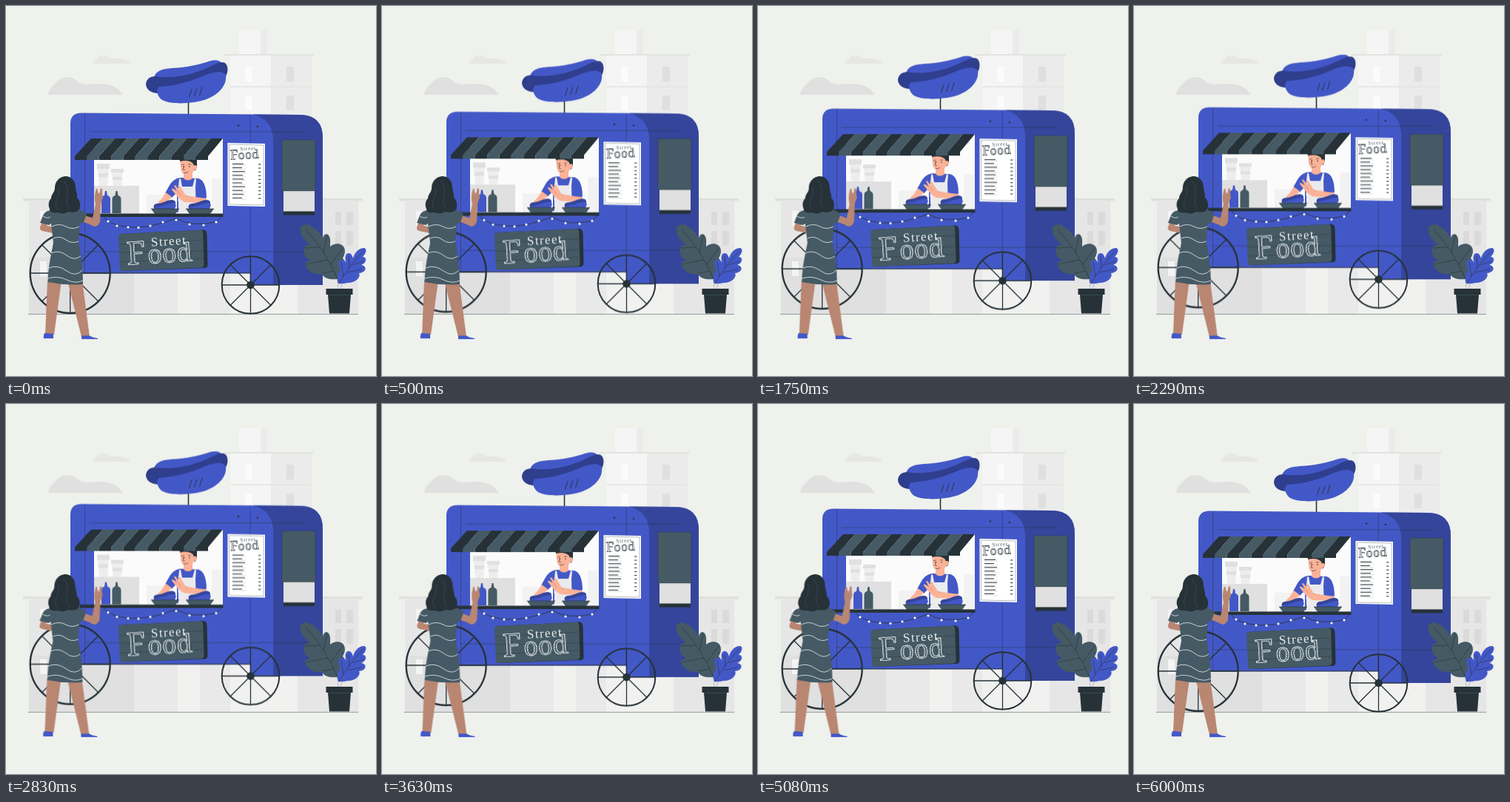
These frames come from a looping animation (500x500 px, 6040 ms). An HTML page:

```html
<!DOCTYPE html>
<html lang="en">
<head>
<meta charset="utf-8">
<title>Street food truck</title>
<style>
html, body { margin: 0; width: 100%; height: 100%; overflow: hidden; background: #eef1ec; }
svg { display: block; width: 100%; height: 100%; }
:root { --blue: #4358c7; --navy: #34459b; --ink: #263238; --slate: #455a64; --skin: #fbb297; --tan: #b98672; }
.blue { fill: var(--blue); }
.navy { fill: var(--navy); }
.ink { fill: var(--ink); }
.slate { fill: var(--slate); }
.skin { fill: var(--skin); }
.tan { fill: var(--tan); }
.line { fill: none; stroke: var(--ink); stroke-width: .6; }
.chalk { fill: none; stroke: #eceff1; stroke-width: .8; }
.limb { fill: none; stroke-linecap: round; stroke-linejoin: round; }
text { font-family: "Noto Serif", "Liberation Serif", serif; }
.thin { font-family: "Liberation Serif", serif; }
#truck { animation: float 6040ms linear infinite; }
#woman { animation: shake 6040ms linear infinite; }
/* three seconds up, three down, then a short rest before the loop */
@keyframes float {
  0%, 99.338%, 100% { transform: translateY(0); }
  49.669% { transform: translateY(-10px); }
}
/* two three-second shakes */
@keyframes shake {
  0%, 49.669%, 99.338%, 100% { transform: translateX(0); }
  4.967%, 44.702%, 54.636%, 94.371% { transform: translateX(-1px); }
  9.934%, 39.735%, 59.603%, 89.404% { transform: translateX(2px); }
  14.901%, 24.834%, 34.768%, 64.57%, 74.503%, 84.437% { transform: translateX(-4px); }
  19.868%, 29.801%, 69.536%, 79.47% { transform: translateX(4px); }
}
</style>
</head>
<body>
<svg viewBox="0 0 500 500">
  <defs>
    <g id="bottle">
      <path d="M0 280V261Q0 257 4 256L5 250H7L8 256Q12 257 12 261V280Z"/>
    </g>
    <g id="dish">
      <path class="navy" d="M4 274Q2 268 8 267C15 267 22 262 28 262Q34 262 33 268L30 274Z"/>
      <path class="blue" d="M5 272C12 272 22 267 31 266Q36 268 32 274H6Q3 274 5 272Z"/>
      <path class="slate" d="M0 274H38L33 281H5Z"/>
      <path class="line" d="M0 274H38"/>
    </g>
  </defs>

  <!-- city -->
  <path fill="#e0e0e0" d="M57 120C57 113 63 109 67 104C74 95 89 94 97 102C102 106 108 106 114 106C124 104 135 105 141 107C149 109 155 115 158 120Z"/>
  <path fill="#e6e7e4" d="M117 78Q118 73 123 72C125 66 133 65 138 69Q142 71 147 71Q164 70 168 78Z"/>
  <g>
    <path fill="#f5f5f5" d="M315 32H344V66H315ZM303 67H358V416H303Z"/>
    <path fill="#ebebeb" d="M344 32H353V66H344ZM358 67H413V416H358Z"/>
    <path fill="#e3e4e2" d="M294 65H416V67H294ZM303 108.500H413V110H303Z"/>
    <path fill="#fbfbfb" d="M323 82h10v20h-10zM323 121h10v20h-10z"/>
    <path fill="#dfdfdf" d="M379 82h10v20h-10zM379 121h10v20h-10z"/>
  </g>
  <path fill="#e6e6e6" d="M31 264H110V416H31ZM394 264H476V416H394Z"/>
  <path fill="#e0e0e0" d="M23 260H110V263.500H23ZM410 260H482V263.500H410ZM31 340H173V416H31Z"/>
  <path fill="#e9e9e9" d="M173 340H232V416H173Z"/>
  <path fill="#f1f1f0" d="M232 340H394V416H232Z"/>
  <path fill="#e9e9e9" d="M202 340H232V416H202ZM262 340H303V416H262Z"/>
  <path fill="#f4f4f4" d="M46 277h9v20h-9zM46 345h9v20h-9z"/>
  <path fill="#dadada" d="M445 278h8v18h-8zM460 278h9v18h-9zM445 304h8v20h-8zM460 304h9v20h-9z"/>
  <path class="line" d="M30 416.500H476" opacity=".75"/>

  <g id="truck">
    <path class="line" style="stroke-width:1.600" d="M246.500 130V147"/>
    <g id="hotdog">
      <path class="blue" d="M200 96C203 87 212 85 224 84C246 83 261 79 275 74.500Q288 71 292 78L290 95L206 112Z"/>
      <path fill="#2f3e8d" d="M201 95C228 99 252 92 269 85C282 79 290 74 296 77C301 81 300 90 297 95L270 107L207 118C195 118 189 112 189 105Q191 95 201 95Z"/>
      <path class="blue" d="M207 109C230 108 252 101 268 94C280 89 291 86 297 93C299 106 289 119 271 126C254 132 224 134 211 127C204 122 202 112 207 109Z"/>
      <path class="line" style="stroke-width:.9" d="M251 112L247.500 123M258 111L254.500 122M265 109L261.500 121"/>
    </g>

    <path class="blue" d="M87 361.300V159Q87 144.500 102 144.500L398 147Q428 148 428 178V377H330V361.300Z"/>
    <path class="navy" d="M334 146.400L398 147Q428 148 428 178V377H361V180Q360 153 334 146.400Z"/>
    <path class="line" d="M106.500 145V361M330 147V377M113 170H405M106 332H428" opacity=".75"/>
    <path class="line" style="stroke-width:1" d="M87 361H330"/>
    <circle class="ink" cx="314" cy="161.500" r="1.200"/>
    <circle class="ink" cx="340" cy="163" r="1.200"/>

    <!-- serving window -->
    <path fill="#fbfbfb" d="M119 179H293V281H119Z"/>
    <path fill="#e0e0e0" d="M119 243H180V281H119Z"/>
    <path fill="#ededed" d="M124 218H139L137 243H126ZM143 224H158L156 243H145Z"/>
    <path fill="#e0e0e0" d="M123 213H140V220H123ZM142 220H159V225H142ZM125 226H138V231H125ZM144 231H157V235H144Z"/>
    <path fill="#f2f2f2" d="M190 255H225V281H190ZM278 233H293V281H278Z"/>

    <g id="cook">
      <path class="blue" d="M236 232C228 233 224 237 220 244L215 253L224 259L231 252V279H262L264 262L271 259C271 247 268 234 259 233Z"/>
      <path fill="#ebebee" d="M236 233L238 244H252L255 233L257 234L256 245L257 279H232L233 245L234 234Z"/>
      <path class="skin" d="M240 224H252V233Q246 238 240 233ZM235 206H255V218Q253 229 245 229Q237 228 236 219Z"/>
      <path class="ink" d="M234 203H258V218L255 223L253 213Q247 207 235 210Z"/>
      <circle class="skin" cx="255" cy="218" r="3"/>
      <path class="line" d="M237 215L241 214M246 214L250 214M241 216L239 221L242 221.500M240 225Q243 227 246 224"/>
      <circle class="ink" cx="240" cy="217" r=".8"/>
      <circle class="ink" cx="248" cy="217" r=".8"/>
      <path class="skin" d="M216 252L224 258L213 269L204 268Q206 264 210 261Z"/>
      <path class="skin" d="M271 260C272 264 268 267 261 266L241 265C234 261 229 255 224 248Q223 245 228 248L231 250L227 243Q229 241 231 245L235 249L232 243Q235 242 238 248L243 256L262 259Z"/>
      <path class="line" stroke-opacity=".35" d="M232 250L236 256M243 256L246 258"/>
      <path class="blue" d="M231 264H233V278H231Z"/>
    </g>
    <use href="#dish" x="196"/>
    <use href="#dish" x="243"/>
    <use href="#bottle" class="blue" x="129"/>
    <use href="#bottle" class="slate" x="143.500"/>
    <path class="ink" d="M100 280.500H293.500V285H100Z"/>
    <g id="awning"></g>

    <!-- menu -->
    <path fill="#fff" d="M299.500 185L350 186V271L299.500 270Z"/>
    <path class="line" opacity=".55" d="M301.500 187L348 188V269L301.500 268Z"/>
    <g transform="rotate(-3 325 203)">
      <text class="thin slate" x="317" y="195" font-size="7" letter-spacing=".8">Street</text>
      <text class="line" x="303" y="206.500" font-size="18">F<tspan font-size="15.500" letter-spacing=".4">ood</tspan></text>
    </g>
    <g id="prices" class="line" style="stroke-width:1"></g>

    <!-- side window -->
    <path class="slate" d="M373 181H418V250H373Z"/>
    <path fill="#e0e0e0" d="M375 250H417V279H375Z"/>
    <path class="ink" d="M375 277.500H417V282.500H375Z"/>
    <path class="line" opacity=".5" d="M373 181V250H418V181Z"/>

    <path class="line" style="stroke-width:.8" d="M132 285Q142 299 179 299Q200 298 230 287Q250 299 284 292L291 285"/>
    <g id="bulbs" fill="#fff"></g>

    <!-- board -->
    <path class="ink" d="M155 308L267 302.500Q271 303 271.500 308L272.500 350Q272 354 268 354L158 358Z"/>
    <path class="slate" d="M155 308L263 302.800Q266 303 266.300 307L267.500 350Q267 353 264 353.500L157 358Q154 358 154 354L152 311Q152 308 155 308Z"/>
    <path class="line" opacity=".6" d="M153 322L267 316M153 333L267 331M154 346L267 341M175 322L176 334M250 331L250 342"/>
    <g transform="rotate(-3.500 210 335)">
      <text class="thin" x="197" y="324" font-size="17" letter-spacing="1.400" fill="#eceff1">Street</text>
      <g class="chalk">
        <text x="163" y="347" font-size="43">F</text>
        <text x="191" y="347" font-size="34">ood</text>
      </g>
      <g class="chalk" style="stroke-width:.5" stroke-dasharray="2 1">
        <text x="164" y="347" font-size="43">F</text>
        <text x="192" y="347" font-size="34">ood</text>
      </g>
    </g>
    <g id="wheels" fill="none" stroke="#263238"></g>
  </g>

  <g id="plant">
    <path d="M449 385Q449 372 446 362M452 385Q453 374 460 366" fill="none" stroke="#b4bcc0"/>
    <path class="slate" d="M448 369C440 370 430 369 427 362C415 364 406 357 404 349C404 345 408 345 412 344C405 341 401 334 403 327C404 323 408 323 411 323C403 317 396 309 398 300C400 294 408 294 415 299C421 303 426 309 428 314C429 308 434 307 436 310C439 314 438 319 438 325C444 320 452 320 456 325C460 331 457 337 455 341C461 346 460 362 448 369Z"/>
    <path class="line" d="M448 369Q432 330 404 301M424 326L404 327M435 343L406 349M443 358L428 361M429 333L434 310M439 349L455 327"/>
    <path class="blue" d="M449 375C446 368 449 360 452 356C448 350 449 344 453 343C457 343 459 345 460 347C457 340 459 334 463 334C467 334 468 338 469 341C471 333 477 327 484 327C488 328 487 334 482 339C488 339 488 347 480 350C488 351 488 360 477 361C480 366 473 374 462 374Q454 376 449 375Z"/>
    <path class="line" d="M450 375Q464 350 484 330M468 350L483 345M461 360L481 356M464 355L463 338M456 365L453 346"/>
    <path class="ink" d="M432.500 382H468.500V390H432.500ZM435 390H466L464 415.500H437Z"/>
    <path stroke="#455a64" stroke-width=".6" d="M435 390.500H466"/>
  </g>

  <g id="woman">
    <path class="tan" d="M56 371H75L65 444H53ZM83 371H103L113 447H102Z"/>
    <path class="blue" d="M52 442L64 443L64 449.500H51Q50 446 52 442ZM102 445.500L113 445.500Q117 448 124 449V450.500H102Z"/>
    <path stroke="#fff" stroke-width=".8" d="M51 450H64M102 450.800H125"/>
    <path class="limb" stroke="#b98672" stroke-width="8" d="M53 290L50 300L65 303"/>
    <path class="limb" stroke="#b98672" stroke-width="9" d="M102 286L121 293"/>
    <path class="tan" d="M115 296L121 268C119 260 120 253 122 247Q124 246 124 251L126 254L128 246Q131 246 130 252L131 259C129 264 128 266 128 270L127 292Q122 301 115 296Z"/>
    <path class="slate" d="M62 276Q53 276 50 283L46 293L58 296L61 294L64 320C62 332 57 350 56.500 373Q80 378 104 376C104 352 101 334 98 318L100 295L105 292L109 281Q101 275 94 274Z"/>
    <path class="chalk" d="M50 284Q56 288 60 285M62 298Q72 293 81 298T99 298M64 314Q73 310 81 316T98 318M61 334Q72 329 82 337T101 338M58 354Q70 349 82 358T103 357M57 368Q70 364 82 370T104 371"/>
    <path class="ink" d="M80 230C71 231 66 238 66 246C66 252 61 254 61 260C57 264 57 270 59 274C58 279 66 280 70 279C75 281 80 281 84 278C92 280 99 278 100 272C101 266 99 262 96 259C97 254 94 250 94 245C94 236 88 230 80 230Z"/>
    <path d="M78 236Q86 245 83 256T86 274M71 244Q73 254 69 261T70 275" fill="none" stroke="#455a64" stroke-width=".5"/>
  </g>
</svg>
<script type="module">
const fill = (id, html) => document.getElementById(id).innerHTML = html;
const times = (n, make) => Array.from({ length: n }, (_, i) => make(i)).join("");

const STRIPES = 11;
const upper = i => 115 + 178 * i / STRIPES;
const lower = i => 93 + 180 * i / STRIPES;
fill("awning", times(STRIPES, i =>
  `<path class="${i % 2 ? "slate" : "ink"}" d="M${upper(i)} 179H${upper(i + 1)}L${lower(i + 1)} 203V208H${lower(i)}V203Z"/>`));

fill("prices", times(10, i => {
  const y = 213.5 + i * 5.1;
  return `<path d="M306 ${y}h${[15, 13, 17, 14][i % 4]}M341 ${y + .5}h3.500"/>
    <path opacity=".3" stroke-width=".5" d="M306 ${y + 2}h18"/>`;
}));

const bulbs = [[138, 291], [150, 297], [165, 299], [179, 299.5], [195, 297],
  [212, 292], [230, 289], [248, 295], [267, 296], [284, 292]];
fill("bulbs", bulbs.map(([x, y]) => `<circle cx="${x}" cy="${y}" r="1.6"/>`).join(""));

const wheel = (x, y, r, rim, hub) => `<g transform="translate(${x} ${y})">
  <circle r="${r}" stroke-width="${rim}"/>
  ${times(4, i => `<path stroke-width="1.300" transform="rotate(${i * 45})" d="M${-r} 0H${r}"/>`)}
  <circle r="${hub}" fill="#263238" stroke="none"/></g>`;
fill("wheels", wheel(86.7, 361, 54, 2.3, 5) + wheel(330.5, 377, 38.8, 2, 5.3));
</script>
</body>
</html>
```
